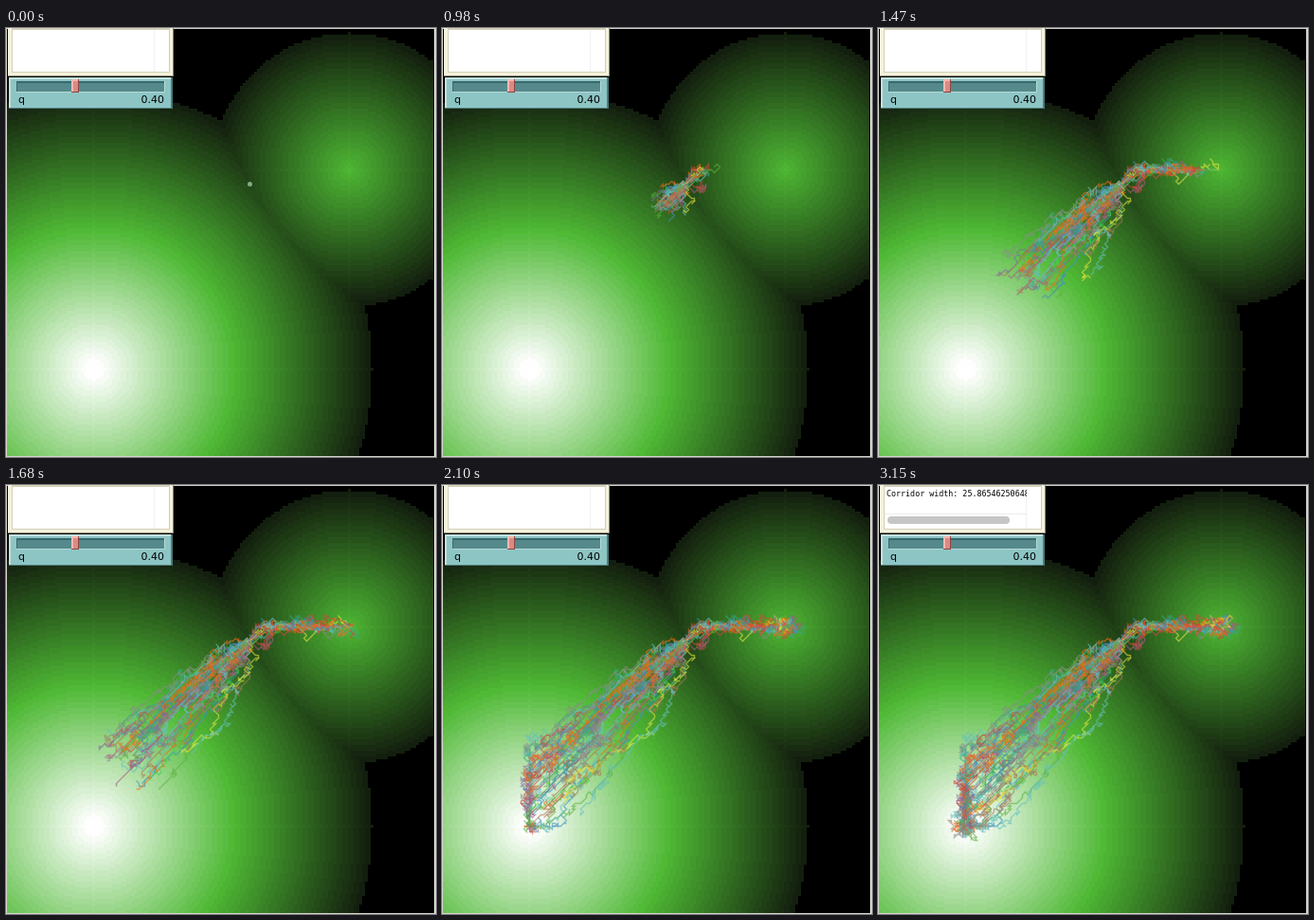
An HTML page with a canvas that plays this animation: 454 px wide and 452 px high, repeating every 3.22 s.

```html
<!DOCTYPE html>
<html lang="en">
<head>
<meta charset="utf-8">
<title>Hilltopping corridors</title>
<style>
html, body { margin: 0; width: 100%; height: 100%; overflow: hidden; background: #d6d4ce; }
canvas, svg { position: absolute; left: 0; top: 0; }
</style>
</head>
<body>
<canvas id="land" width="454" height="452"></canvas>
<canvas id="trails" width="454" height="452"></canvas>
<svg width="454" height="452">
  <!-- output box -->
  <rect x="2" width="175" height="51" fill="#8f8c78"/>
  <rect x="2" width="174" height="50" fill="#f4f1dc"/>
  <rect x="6" width="167" height="47" fill="#d3cfb8"/>
  <rect x="7" y="2" width="165" height="44" fill="#fff"/>
  <path d="M156.5 2V46" stroke="#f0f0f0"/>
  <g id="output">
    <path d="M7 30.5H156" stroke="#ececec"/>
    <rect x="10" y="33" width="129" height="8" rx="4" fill="#c6c6c6"/>
    <svg width="157" height="30">
      <text x="9" y="12" font-family="'DejaVu Sans Mono', monospace" font-size="8.35">Corridor width: 25.86546250648</text>
    </svg>
  </g>
  <!-- slider -->
  <rect x="3" y="52" width="173" height="33" fill="#4f7a7c"/>
  <rect x="3" y="52" width="171" height="32" fill="#c3e2df"/>
  <rect x="5" y="54" width="169" height="30" fill="#8dc5c4"/>
  <rect x="11" y="56" width="156" height="11" fill="#38686c"/>
  <rect x="12" y="58" width="155" height="9" fill="#56898b"/>
  <path d="M11 67.5H167.5V56" fill="none" stroke="#b4dad8"/>
  <rect x="69" y="54" width="8" height="14" fill="#8e4644"/>
  <rect x="69" y="54" width="7" height="13" fill="#f3b9b2"/>
  <rect x="71" y="56" width="5" height="11" fill="#dc8a84"/>
  <g font-family="'DejaVu Sans', sans-serif" font-size="11">
    <text x="13" y="79">q</text>
    <text x="167" y="79" text-anchor="end">0.40</text>
  </g>
</svg>
<script>
const SIZE = 150, CELL = 3, Q = 0.4, COUNT = 50, TICKS = 200, TICKS_PER_STEP = 8;
const LOOP = 3220, STEP = 70, START = 840, REPORT = 2730;
const COLORS = ['#8c8c8c', '#d0483c', '#f16a15', '#a87858', '#e6e640', '#59b03c', '#44d14b',
  '#3aa884', '#64c0c0', '#3f93be', '#5a7cab', '#8a68a6', '#a85a80', '#dc8a9c'];
const land = document.getElementById('land').getContext('2d');
const trails = document.getElementById('trails').getContext('2d');
const output = document.getElementById('output');

let seed = 7;
function random() {
  seed = (seed + 0x6D2B79F5) | 0;
  let t = Math.imul(seed ^ seed >>> 15, 1 | seed);
  t = t + Math.imul(t ^ t >>> 7, 61 | t) ^ t;
  return ((t ^ t >>> 14) >>> 0) / 4294967296;
}

const elevation = (x, y) => Math.max(100 - Math.hypot(x - 30, y - 30), 50 - Math.hypot(x - 120, y - 100));
const px = x => x * CELL + 2.5;
const py = y => (SIZE - 1 - y) * CELL + 2.5;

function shade(h) {
  if (h < 2) return '#000';
  const low = [16, 23, 12], mid = [78, 184, 52], high = [255, 255, 255];
  const [a, b] = h < 50 ? [low, mid] : [mid, high];
  const k = h < 50 ? h / 50 : Math.min(1, (h - 50) / 47);
  return `rgb(${a.map((v, i) => Math.round(v + (b[i] - v) * k))})`;
}

// The land shows contour bands two units high.
function drawLand() {
  land.fillStyle = '#000';
  land.fillRect(1, 1, 451, 450);
  for (let x = 0; x < SIZE; x++) for (let y = 0; y < SIZE; y++) {
    land.fillStyle = shade(Math.floor(elevation(x, y) / 2) * 2 + 0.5);
    land.fillRect(px(x) - 1.5, py(y) - 1.5, CELL, CELL);
  }
}

function neighbors([x, y]) {
  const list = [];
  for (let dx = -1; dx < 2; dx++) for (let dy = -1; dy < 2; dy++)
    if (dx || dy) list.push([x + dx, y + dy]);
  return list;
}

// Each walker climbs with chance Q, otherwise steps to a random neighbor.
function walk() {
  const path = [[85, 95]];
  for (let t = 0; t < TICKS; t++) {
    const here = path[t], near = neighbors(here);
    path.push(random() < Q
      ? near.reduce((best, p) => elevation(...p) > elevation(...best) ? p : best, here)
      : near[Math.floor(random() * 8)]);
  }
  return path;
}

const walkers = Array.from({ length: COUNT }, () => ({
  color: COLORS[Math.floor(random() * COLORS.length)],
  path: walk()
}));

function drawStart() {
  trails.fillStyle = '#82aa86';
  trails.beginPath();
  trails.arc(px(85), py(95), 2.5, 0, 7);
  trails.fill();
}

function drawTrails(tick) {
  trails.clearRect(0, 0, 454, 452);
  if (!tick) drawStart();
  trails.lineWidth = 1.4;
  trails.globalAlpha = 0.6;
  for (let t = 0; t < tick; t += TICKS_PER_STEP)
    for (const { color, path } of walkers) {
      trails.strokeStyle = color;
      trails.beginPath();
      for (const [x, y] of path.slice(t, t + TICKS_PER_STEP + 1)) trails.lineTo(px(x), py(y));
      trails.stroke();
    }
  trails.globalAlpha = 1;
}

let shown = -1;
function frame() {
  const time = performance.now() % LOOP;
  const steps = Math.max(0, Math.floor((time - START) / STEP));
  const tick = Math.min(TICKS, steps * TICKS_PER_STEP);
  if (tick !== shown) drawTrails(shown = tick);
  output.style.display = time < REPORT ? 'none' : '';
  requestAnimationFrame(frame);
}

drawLand();
frame();
</script>
</body>
</html>
```
